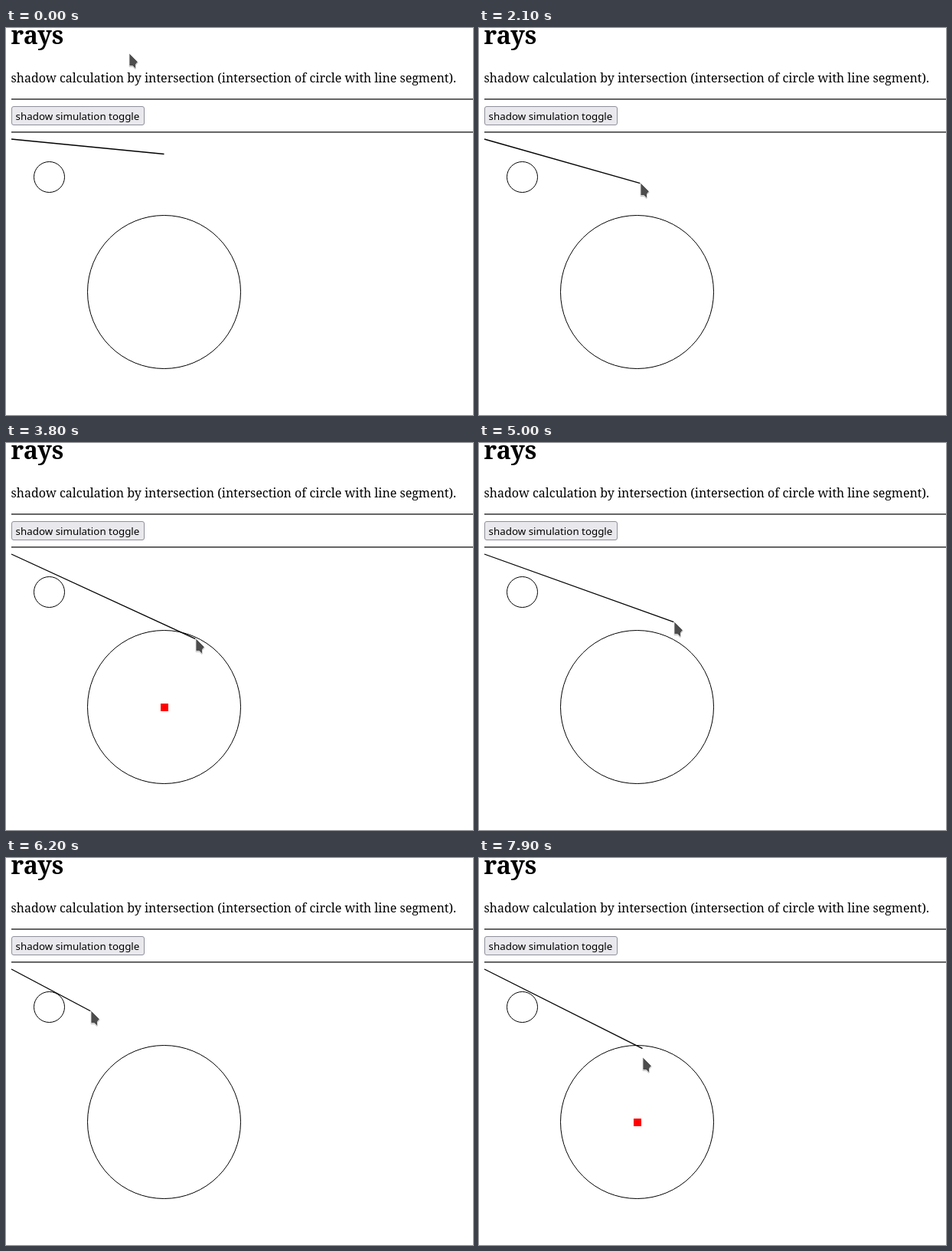
An HTML page for the animation above (8000 ms loop, 610x505 px).

```html
<!DOCTYPE html>
<html lang="en">
<head>
<meta charset="utf-8">
<title>rays</title>
<style>
  html, body { margin: 0; width: 100%; height: 100%; overflow: hidden; background: #fff; }
  svg { display: block; }
  text { font: 16px "Noto Serif", serif; }
  .title { font-size: 32px; font-weight: bold; }
  .label { font: 13.333px "Noto Sans", sans-serif; }
  .ink { fill: none; stroke: #000; }
  #cursor { filter: drop-shadow(.5px 1px .7px #0004); }
</style>
</head>
<body>
<svg width="610" height="505" viewBox="0 0 610 505">
  <text class="title" x="6.6" y="21">rays</text>
  <text x="6.6" y="71">shadow calculation by intersection (intersection of circle with line segment).</text>
  <path stroke="#4b4b4b" d="M7 92.5H610M7 135.5H610"/>
  <path stroke="#808080" d="M7 93.5H610M7 136.5H610"/>
  <rect x="7.5" y="102.5" width="173" height="24" rx="2.5" fill="#e9e9ed" stroke="#8f8f9d"/>
  <text class="label" x="12.6" y="120">shadow simulation toggle</text>
  <g id="circles"></g>
  <line id="ray" class="ink" x1="7" y1="145" stroke-width="1.3"/>
  <path id="cursor" d="M0 0V16.5H4.5L7.5 19.5 8.5 19V14.5L11.2 11.2Z" fill="#4d4d4d" stroke="#fff" stroke-width=".7"/>
</svg>
<script>
const LOOP = 8000, STEP = 100;
const ORIGIN = { x: 7, y: 145 };
const REST = { x: 161, y: 33 }, FIRST_END = { x: 206.5, y: 164.5 };
const ENTER = 1500, LAST_UPDATE = 7800;
const circles = [{ x: 50, y: 50, r: 20 }, { x: 200, y: 200, r: 100 }];

// Pointer moves: start, duration, destination
const moves = [
  [400, 300, 166, 79], [900, 100, 159, 98], [1400, 100, 178, 153],
  [1600, 900, 219, 214], [2500, 200, 241, 238], [3000, 300, 247, 248],
  [3600, 200, 248, 255], [4900, 500, 267, 194], [5500, 700, 111, 199],
  [6200, 200, 110, 200], [6400, 200, 109, 205], [7300, 500, 214, 248],
  [7800, 100, 214, 260]
];

const easeOut = k => 1 - (1 - k) ** 2;

function pointerAt(t) {
  let { x, y } = REST;
  for (const [start, duration, toX, toY] of moves) {
    if (t <= start) break;
    const k = easeOut(Math.min(1, (t - start) / duration));
    x += (toX - x) * k;
    y += (toY - y) * k;
  }
  return { x: Math.round(x), y: Math.round(y) };
}

// The ray follows the pointer once it is over the drawing area
function rayEnd(t) {
  if (t < ENTER) return FIRST_END;
  const p = pointerAt(Math.min(t, LAST_UPDATE));
  return { x: p.x - .5, y: p.y + .7 };
}

function hits(end, c) {
  const dx = end.x - ORIGIN.x, dy = end.y - ORIGIN.y;
  const k = Math.min(1, (c.x * dx + c.y * dy) / (dx * dx + dy * dy));
  return Math.hypot(c.x - k * dx, c.y - k * dy) < c.r;
}

function set(el, attrs) {
  for (const key in attrs) el.setAttribute(key, attrs[key]);
  return el;
}

function add(name, attrs) {
  const el = document.createElementNS("http://www.w3.org/2000/svg", name);
  return document.getElementById("circles").appendChild(set(el, attrs));
}

for (const c of circles) {
  const x = ORIGIN.x + c.x, y = ORIGIN.y + c.y;
  add("circle", { class: "ink", cx: x - .5, cy: y - .5, r: c.r });
  c.mark = add("rect", { x: x - 5, y: y - 5, width: 10, height: 10, fill: "red" });
}

const ray = document.getElementById("ray");
const cursor = document.getElementById("cursor");

function draw(now) {
  const t = Math.floor((now % LOOP) / STEP) * STEP;
  const p = pointerAt(t), end = rayEnd(t);
  set(cursor, { transform: `translate(${p.x} ${p.y})` });
  set(ray, { x2: end.x, y2: end.y });
  for (const c of circles) set(c.mark, { visibility: hits(end, c) ? "visible" : "hidden" });
}

const start = performance.now();
function tick() {
  draw(performance.now() - start);
  requestAnimationFrame(tick);
}
tick();
</script>
</body>
</html>
```
